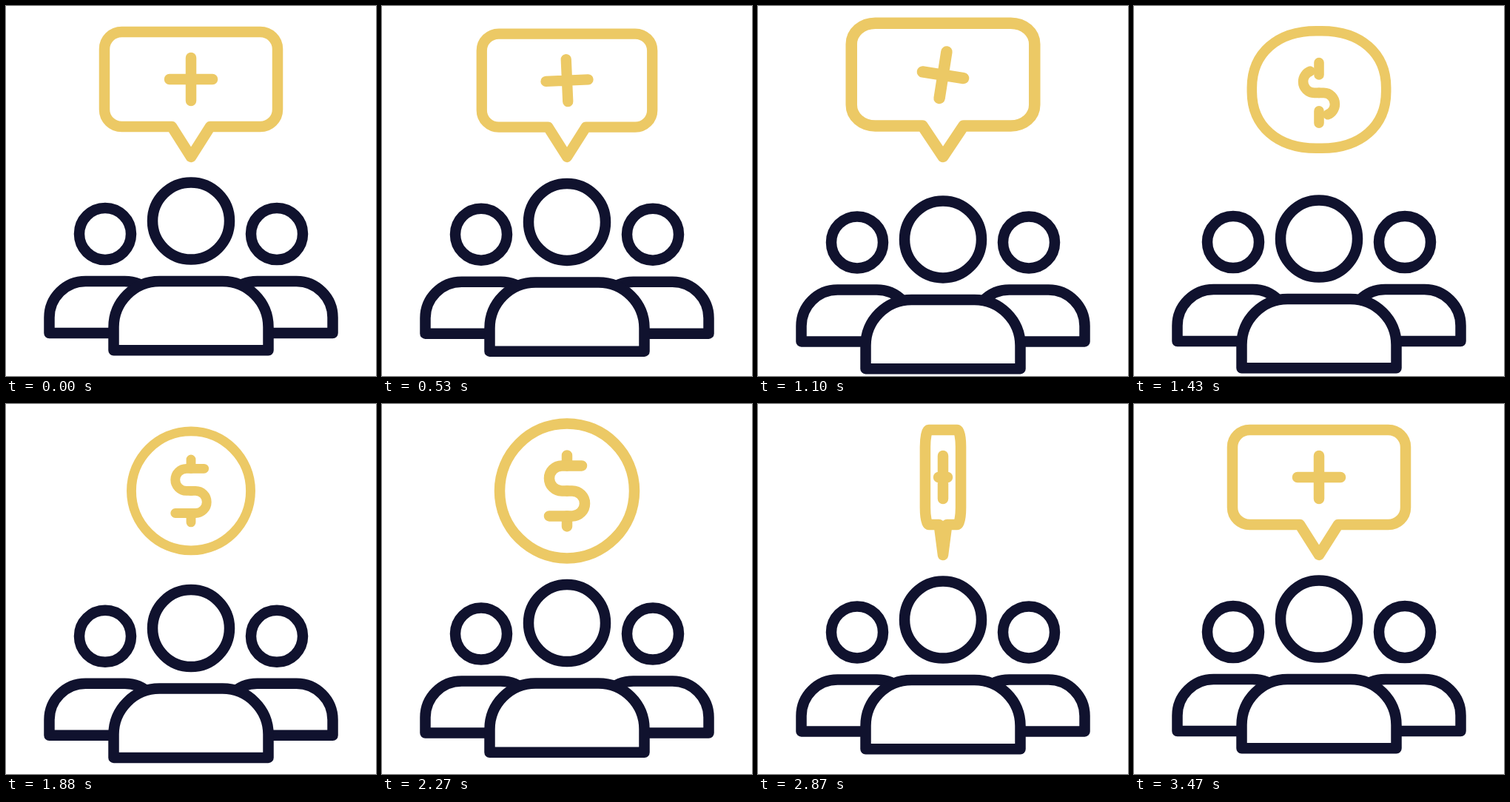
An HTML page with a canvas for the animation above (3500 ms loop, 500x500 px).

```html
<!DOCTYPE html>
<html lang="en">
<head>
<meta charset="utf-8">
<title>Group idea to coin</title>
<style>
html, body { margin: 0; height: 100%; overflow: hidden; background: #fff; }
canvas { display: block; width: 100vw; height: 100vh; }
</style>
</head>
<body>
<canvas id="stage" width="500" height="500"></canvas>
<script>
const ctx = document.getElementById('stage').getContext('2d');
const NAVY = '#10122e', GOLD = '#ecc965', LINE = 14.5, COIN_Y = 117.4;
const mix = (a, b, p) => a + (b - a) * p;
const clamp = v => Math.max(0, Math.min(1, v));

// Smooth curve through [step, value] pairs, flat at the turning points
function track(...keys) {
  const slope = i => (keys[i + 1][1] - keys[i][1]) / (keys[i + 1][0] - keys[i][0]);
  const tangent = keys.map((_, i) => {
    if (!i || i === keys.length - 1) return 0;
    const a = slope(i - 1), b = slope(i);
    return a * b > 0 ? 2 * a * b / (a + b) : 0;
  });
  return n => {
    if (n <= keys[0][0]) return keys[0][1];
    const i = keys.findIndex(k => k[0] >= n) - 1;
    if (i < 0) return keys[keys.length - 1][1];
    const [n0, v0] = keys[i], [n1, v1] = keys[i + 1];
    const d = n1 - n0, t = (n - n0) / d, u = 1 - t;
    return v0 * u * u * (1 + 2 * t) + v1 * t * t * (3 - 2 * t)
      + d * t * u * (u * tangent[i] - t * tangent[i + 1]);
  };
}

const sink = track([0, 0], [9, 15], [18, 24.5], [23, 25], [32, 24], [36.5, 21], [47, 12.6],
  [54, 8], [60, 5.5], [72, 2], [80, 1], [92, 0]);
const scale = track([0, 1], [9, .88], [19, 1.074], [32, .935], [43, .87], [47, .885], [54, 1.01], [60, 1]);
const morph = track([19, 0], [32, .77], [40, 1]);
const tilt = track([0, 0], [9, -20], [19, 12], [25, 0]);
const flip = track([61, 1], [77, 0], [94, -1]);
const squash = track([68, 0], [77, 1]);

function ring(x, y, r) {
  ctx.beginPath();
  ctx.arc(x, y, r, 0, 7);
  ctx.stroke();
}

function body(x, y, w, h, r) {
  ctx.beginPath();
  ctx.roundRect(x, y, w, h, [r, r, 0, 0]);
  ctx.fill();
  ctx.stroke();
}

function people(dy) {
  ctx.strokeStyle = NAVY;
  ctx.fillStyle = '#fff';
  ctx.lineWidth = LINE;
  const side = dy * .46;
  for (const x of [134, 366]) {
    body(x - 75.5, 372 + side, 151, 70, 49);
    ring(x, 308 + side, 35);
  }
  body(145.5, 372 + dy, 209, 93.3, 62);
  ring(250, 290.5 + dy, 52);
}

// Speech bubble (q = 0) to circle (q = 1); sx narrows it during the flip
function outline(s, q, e, sx, z) {
  const cy = mix(COIN_Y, 119.5, z), r = 91 * s * mix(1, .93, z);
  const w = mix(117 * s, 91 * s, q) * sx;
  const tip = 204 - 10 * q;
  const top = mix(tip - 169 * s, cy - r, q), bot = mix(tip - 41 * s, cy + r, q);
  const round = q * (2 - q);
  const rx = w * mix(.2, 1, round), ry = (bot - top) / 2 * mix(.36, 1, round);
  const k = 1 - (.5523 + .3 * q * (1 - q));
  const gap = Math.min(26 * s * sx, w - rx);
  const L = 250 - w, R = 250 + w;
  ctx.beginPath();
  ctx.moveTo(L + rx, top);
  ctx.lineTo(R - rx, top);
  ctx.bezierCurveTo(R - rx * k, top, R, top + ry * k, R, top + ry);
  ctx.lineTo(R, bot - ry);
  ctx.bezierCurveTo(R, bot - ry * k, R - rx * k, bot, R - rx, bot);
  if (e < 1) {
    ctx.lineTo(250 + gap, bot);
    ctx.lineTo(250, bot + 41 * s * (1 - e));
    ctx.lineTo(250 - gap, bot);
  }
  ctx.lineTo(L + rx, bot);
  ctx.bezierCurveTo(L + rx * k, bot, L, bot - ry * k, L, bot - ry);
  ctx.lineTo(L, top + ry);
  ctx.bezierCurveTo(L, top + ry * k, L + rx * k, top, L + rx, top);
  ctx.closePath();
  ctx.stroke();
}

// Plus sign (q = 0) to dollar sign (q = 1)
function sign(s, q, e, sx, angle) {
  const shape = (size, turn, draw) => {
    ctx.save();
    ctx.translate(250, mix(204 - 105 * s, COIN_Y, e));
    ctx.scale(size * sx, size);
    ctx.rotate(turn);
    ctx.beginPath();
    draw();
    ctx.restore();
    ctx.stroke();
  };
  const len = mix(29, 48, q), bar = 29 * (1 - 2.5 * q);
  shape(s, angle, () => {
    for (const d of [-1, 1]) {
      ctx.moveTo(0, d * 34 * q);
      ctx.lineTo(0, d * len);
    }
    if (bar > 0) {
      ctx.moveTo(-bar, 0);
      ctx.lineTo(bar, 0);
    }
  });
  const grown = clamp((q - .4) / .6), size = s * mix(.8, 1, q);
  if (!grown) return;
  if (grown < 1) ctx.setLineDash([87 * grown * size, 999]);
  for (const [turn, end] of [[0, 20], [Math.PI, 24]]) {
    shape(size, turn, () => {
      ctx.moveTo(0, 0);
      ctx.arc(-7, -17, 17, Math.PI / 2, Math.PI * 1.5);
      ctx.lineTo(end, -34);
    });
  }
  ctx.setLineDash([]);
}

function draw() {
  const t = performance.now() % 3500;
  const n = t < 500 ? 0 : Math.floor((t - 500) / 30) + 1;
  const turned = flip(n) <= 0;
  const s = scale(n), q = turned ? 0 : morph(n), e = clamp(q * 1.3);
  const sx = Math.max(.005, Math.abs(flip(n)));

  ctx.fillStyle = '#fff';
  ctx.fillRect(0, 0, 500, 500);
  ctx.lineCap = ctx.lineJoin = 'round';
  people(sink(n));
  ctx.strokeStyle = GOLD;
  ctx.lineWidth = LINE * s;
  outline(s, q, e, sx, turned ? 0 : squash(n));
  sign(s, q, e, sx, tilt(n) * Math.PI / 180);
  requestAnimationFrame(draw);
}
draw();
</script>
</body>
</html>
```
